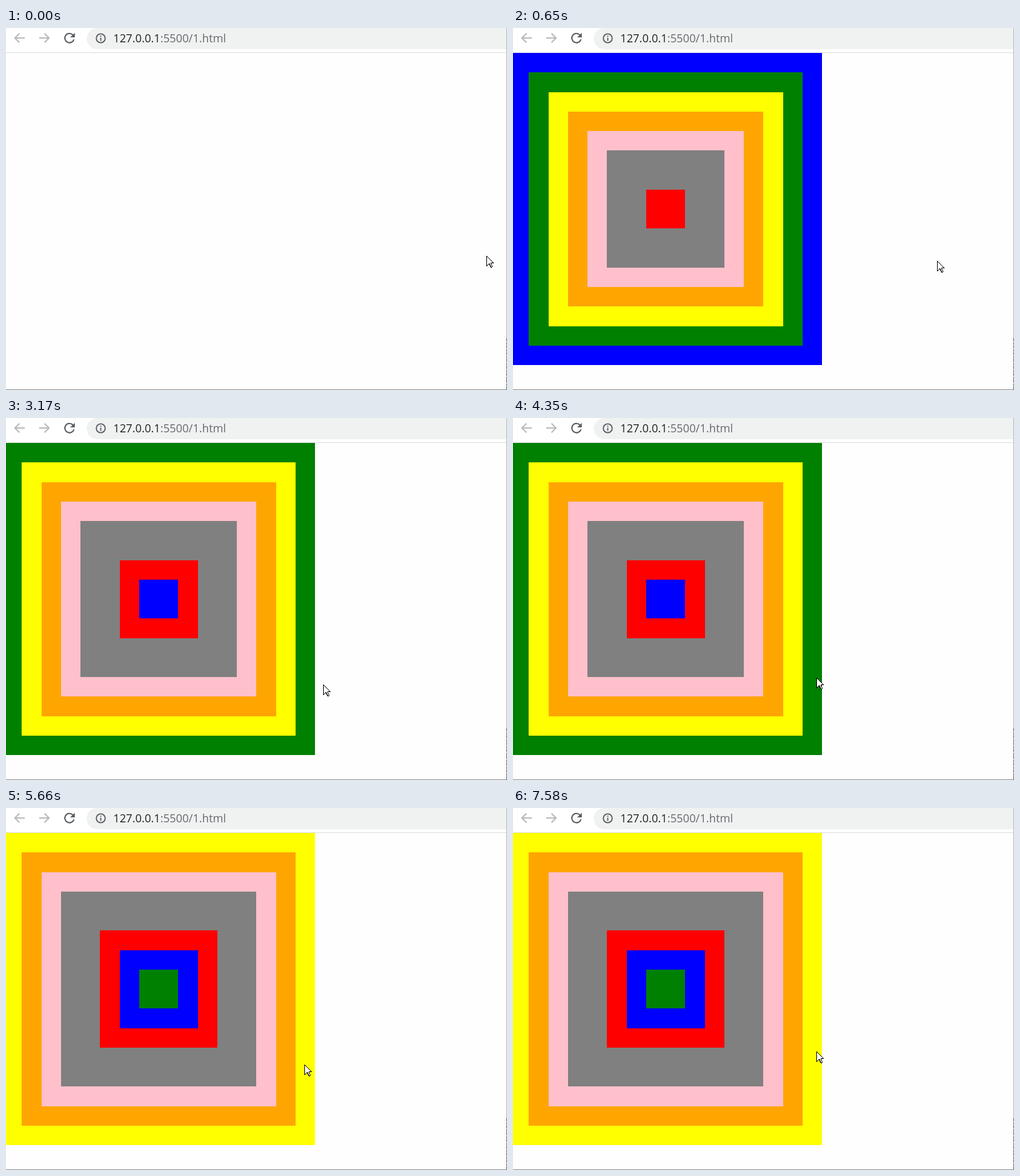
Recreate the animation shown at these times as an HTML page. Size 801x580 px, loop 8 s.

```html
<!DOCTYPE html>
<html lang="en">
<head>
<meta charset="utf-8">
<title>Nested squares</title>
<style>
  html, body { margin: 0; width: 100%; height: 100%; overflow: hidden; background: #fefefe; }
  svg { display: block; width: 801px; height: 580px; overflow: hidden; }
  text { font: 17.8px "Open Sans", "Noto Sans", sans-serif; }
  .crisp { shape-rendering: crispEdges; }
</style>
</head>
<body>
<svg viewBox="0 0 801 580">
  <rect width="801" height="39" fill="#fff"/>
  <path d="M801 0H146A17 17 0 0 0 146 34H801Z" fill="#f0f2f2"/>
  <rect class="crisp" y="39" width="801" height="1" fill="#dadcdc"/>

  <g fill="none" stroke="#b6b8ba" stroke-width="2">
    <path id="arrow" d="M30 16H15M21.5 8.7L14.2 16L21.5 23.3"/>
    <use href="#arrow" transform="translate(83 0) scale(-1 1)"/>
  </g>
  <path transform="translate(88.8 3.4) scale(1.06)" fill="#5b5f64"
    d="M17.65 6.35A8 8 0 1 0 19.73 14H17.65A6 6 0 1 1 16.22 7.78L13 11H20V4Z"/>
  <g fill="none" stroke="#5b5f64" stroke-width="1.9">
    <circle cx="151.5" cy="16.5" r="7.1"/>
    <path d="M151.5 15.5V20.6M151.5 12.2V14.1"/>
  </g>
  <text x="171.5" y="23" fill="#202124">127.0.0.1<tspan fill="#66696d">:5500/1.html</tspan></text>

  <g id="squares" class="crisp"></g>

  <g class="crisp">
    <rect x="800" width="1" height="580" fill="#b4b4b4"/>
    <path d="M800.5 497V580" stroke="#5c5c5c" stroke-dasharray="5 2 3 1"/>
    <rect y="579" width="801" height="1" fill="#8c8c8c"/>
  </g>

  <path id="cursor" class="crisp" fill="#fff" stroke="#000"
    d="M.5 .5V16.5L4.5 12.5L7.5 18.5H8.5L9.5 17.5L7.5 12.5V11.5H11.5Z"/>
</svg>
<script>
const LOOP = 8000;
const TICK = 130;         // typical time between cursor positions
const FIRST_SHOWN = 650;  // squares appear
const SHIFT_EVERY = 2505; // then the colours move outwards
const COLORS = ['blue', 'green', 'yellow', 'orange', 'pink', 'gray', 'gray', 'red'];
const COUNT = COLORS.length;

// Cursor glides: first and last change in ms, and where the tip comes to rest
const START = { x: 768, y: 365 };
const GLIDES = [
  { from: 500, to: 650, x: 678, y: 373 },
  { from: 800, to: 800, x: 723, y: 465 },
  { from: 950, to: 950, x: 507, y: 427 },
  { from: 4350, to: 4350, x: 485, y: 416 },
  { from: 4490, to: 4490, x: 477, y: 411 },
  { from: 6100, to: 6340, x: 288, y: 325 },
  { from: 6490, to: 6610, x: 252, y: 296 },
  { from: 6910, to: 7040, x: 389, y: 416 },
  { from: 7190, to: 7190, x: 429, y: 414 },
  { from: 7340, to: 7580, x: 485, y: 390 }
];

const easeIn = p => p * p;
const mix = (a, b, p) => Math.round(a + (b - a) * p);
const moveTo = (x, y) => `translate(${x}px, ${y}px)`;

// Plays [time, value] steps as hard changes
function playSteps(element, property, steps) {
  const frames = steps.map(([time, value]) =>
    ({ offset: time / LOOP, [property]: value, easing: 'step-end' }));
  frames.push({ offset: 1, [property]: steps[steps.length - 1][1] });
  element.animate(frames, { duration: LOOP, iterations: Infinity });
}

function cursorSteps() {
  const steps = [[0, moveTo(START.x, START.y)]];
  let last = START;
  for (const glide of GLIDES) {
    const gaps = Math.round((glide.to - glide.from) / TICK);
    for (let k = 0; k <= gaps; k++) {
      const p = easeIn((k + 1) / (gaps + 1));
      const time = mix(glide.from, glide.to, gaps ? k / gaps : 0);
      steps.push([time, moveTo(mix(last.x, glide.x, p), mix(last.y, glide.y, p))]);
    }
    last = glide;
  }
  return steps;
}

function colorSteps(i) {
  const steps = [[0, 'transparent']];
  for (let k = 0; FIRST_SHOWN + k * SHIFT_EVERY < LOOP; k++) {
    steps.push([FIRST_SHOWN + k * SHIFT_EVERY, COLORS[(i + k) % COUNT]]);
  }
  return steps;
}

const squares = document.getElementById('squares');
for (let i = 0; i < COUNT; i++) {
  const near = Math.round(40 + 31.25 * i);
  const size = Math.round(540 - 31.25 * i) - near;
  const rect = document.createElementNS(squares.namespaceURI, 'rect');
  const box = { x: near - 46, y: near, width: size, height: size, fill: 'transparent' };
  for (const key in box) rect.setAttribute(key, box[key]);
  squares.append(rect);
  playSteps(rect, 'fill', colorSteps(i));
}

playSteps(document.getElementById('cursor'), 'transform', cursorSteps());
</script>
</body>
</html>
```
